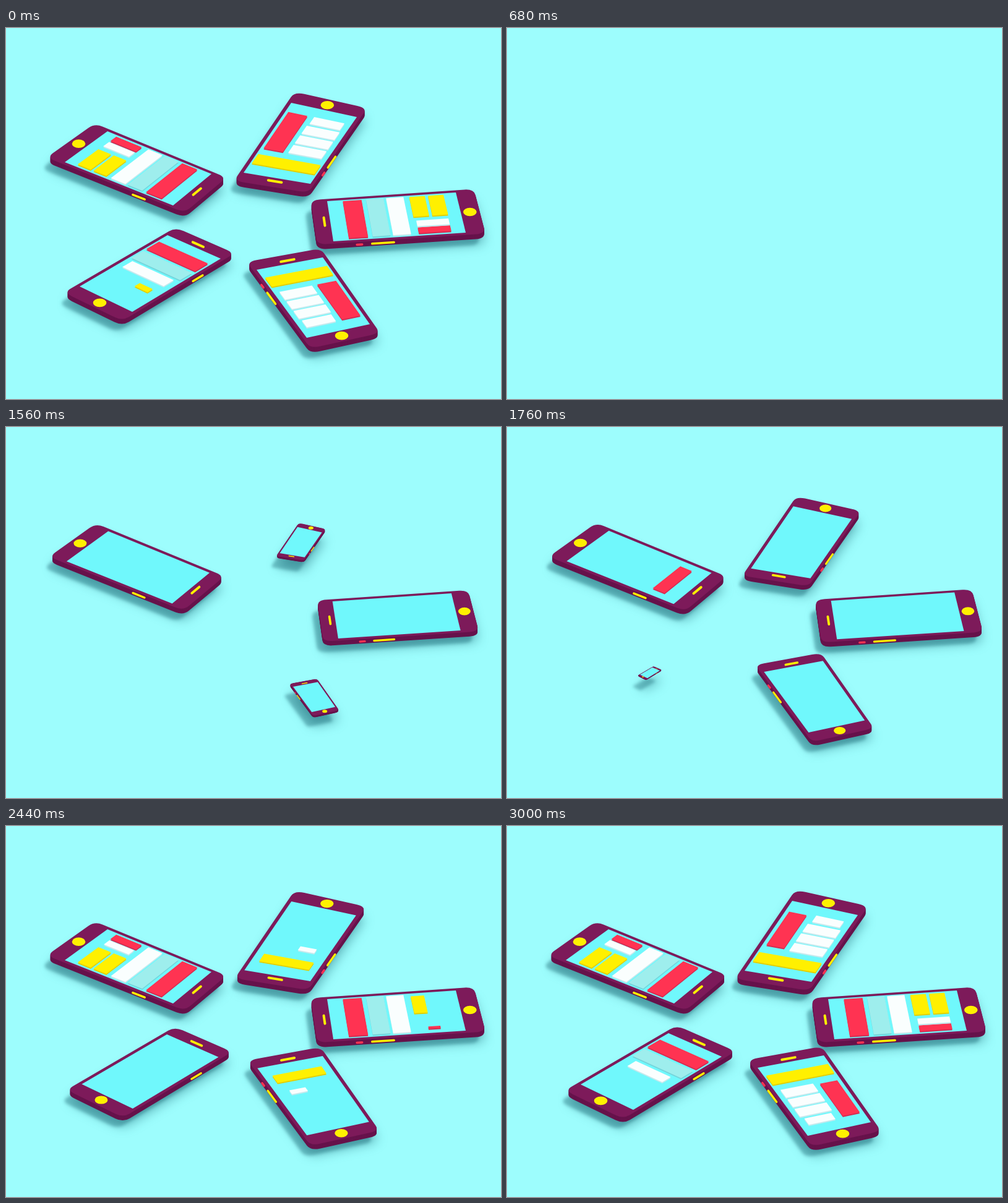
An HTML page with a canvas that plays this animation: 800x600 px, repeating every 3.04 s.

```html
<!DOCTYPE html>
<html lang="en">
<head>
<meta charset="utf-8">
<title>Phones</title>
<style>
html, body { margin: 0; width: 100%; height: 100%; overflow: hidden; background: #9dfdfd; }
canvas { display: block; width: 800px; height: 600px; }
</style>
</head>
<body>
<canvas id="stage" width="800" height="600"></canvas>
<script>
const ctx = document.getElementById('stage').getContext('2d');
const LOOP = 3040, STEP = 40, EMPTY = 680;

const RED = ['#ff3352', '#d42c52'];
const YELLOW = ['#fff000', '#e3cf00'];
const WHITE = ['#fafefe', '#c4e9ed'];
const MINT = ['#9eeeed', '#74d5db'];
const BODY = '#7d1a5a', SIDE = '#66124b', SCREEN = '#70f8fc';

// Blocks on a screen: [u0, v0, u1, v1, colours, delay]
const page = [
  [.04, .12, .96, .265, RED, 0],
  [.04, .30, .96, .435, MINT, 140],
  [.04, .455, .96, .59, WHITE, 295],
  [.46, .635, .95, .755, YELLOW, 380],
  [.05, .65, .19, .895, RED, 480],
  [.46, .78, .95, .90, YELLOW, 540],
  [.22, .65, .36, .895, WHITE, 600]
];
const list = [
  [.03, .13, .97, .265, YELLOW, 0],
  [.08, .35, .58, .465, WHITE, 70],
  [.08, .49, .58, .605, WHITE, 230],
  [.08, .63, .58, .745, WHITE, 390],
  [.66, .35, .95, .87, RED, 510],
  [.08, .77, .58, .88, WHITE, 550]
];

// quad: screen corners, clockwise from the speaker's left; edge: side with buttons
const phones = [
  { quad: [[332, 236], [270, 287], [95, 217], [164, 167]], edge: 1, blocks: page, born: 765, fill: 1660, leave: 220 },
  { quad: [[492, 252], [384, 234], [461, 121], [567, 144]], edge: 0, blocks: list, born: 1490, fill: 2330, leave: 300 },
  { quad: [[529, 345], [519, 280], [727, 266], [743, 331]], edge: 0, blocks: page, born: 1160, fill: 1930, leave: 260 },
  { quad: [[261, 335], [347, 373], [204, 459], [119, 418]], edge: 1, blocks: page, born: 1720, fill: 2620, leave: 340 },
  { quad: [[405, 391], [512, 371], [588, 479], [486, 501]], edge: 0, blocks: list, born: 1490, fill: 2330, leave: 300 }
];

const POP = [[0, 0], [40, .14], [80, .45], [120, .70], [180, .82], [270, .89],
             [500, .95], [700, .968], [940, .986], [1270, 1]];
const GROW = [[0, 0], [40, .5], [80, .7], [120, .84], [200, 1]];

const mix = (a, b, k) => a + (b - a) * k;

function sample(keys, t) {
  if (t <= 0) return 0;
  for (let i = 1; i < keys.length; i++) {
    const [t0, a] = keys[i - 1], [t1, b] = keys[i];
    if (t < t1) return mix(a, b, (t - t0) / (t1 - t0));
  }
  return 1;
}

function project([a, b, c, d], u, v) {
  return [0, 1].map(i => mix(mix(a[i], b[i], u), mix(d[i], c[i], u), v));
}

function fillPath(path, color, dx = 0, dy = 0) {
  ctx.save();
  ctx.translate(dx, dy);
  ctx.fillStyle = color;
  ctx.fill(path);
  ctx.restore();
}

function polygon(pts) {
  const path = new Path2D();
  pts.forEach(([x, y]) => path.lineTo(x, y));
  path.closePath();
  return path;
}

// Rounds the corners in screen units, so that they follow the perspective
function roundedBody(at) {
  const u0 = -.055, u1 = 1.055, v0 = -.125, v1 = 1.145, ru = .15, rv = .075;
  const path = new Path2D();
  path.moveTo(...at(u0 + ru, v0));
  path.lineTo(...at(u1 - ru, v0));
  path.quadraticCurveTo(...at(u1, v0), ...at(u1, v0 + rv));
  path.lineTo(...at(u1, v1 - rv));
  path.quadraticCurveTo(...at(u1, v1), ...at(u1 - ru, v1));
  path.lineTo(...at(u0 + ru, v1));
  path.quadraticCurveTo(...at(u0, v1), ...at(u0, v1 - rv));
  path.lineTo(...at(u0, v0 + rv));
  path.quadraticCurveTo(...at(u0, v0), ...at(u0 + ru, v0));
  return path;
}

function shadow(path, dx, dy, blur, alpha) {
  ctx.filter = `blur(${blur}px)`;
  fillPath(path, `rgba(22,98,112,${alpha})`, dx, dy);
  ctx.filter = 'none';
}

function drawPhone(phone, time, now) {
  let s = sample(POP, time - phone.born);
  if (now < EMPTY) {
    const k = Math.min(1, Math.max(0, (now - phone.leave) / 320));
    s *= 1 - k * k * k;
  }
  if (s < .01) return;

  const mid = project(phone.quad, .5, .515);
  const at = (u, v, dy = 0) => {
    const p = project(phone.quad, u, v);
    return [mix(mid[0], p[0], s), mix(mid[1], p[1], s) + dy * s];
  };
  const rect = (u0, v0, u1, v1, dy) =>
    polygon([at(u0, v0, dy), at(u1, v0, dy), at(u1, v1, dy), at(u0, v1, dy)]);
  const pill = (a, b, width, color) => {
    ctx.beginPath();
    ctx.moveTo(...a);
    ctx.lineTo(...b);
    ctx.lineCap = 'round';
    ctx.lineWidth = width * s;
    ctx.strokeStyle = color;
    ctx.stroke();
  };

  const body = roundedBody(at);
  shadow(body, -9, 18, 2.5, .38);
  shadow(body, 0, 17, 9, .45);
  for (let h = 8; h > 0; h--) fillPath(body, SIDE, 0, h * s);
  fillPath(body, BODY);
  fillPath(rect(0, 0, 1, 1), SCREEN);

  if (phone.edge) {
    pill(at(1.06, .24, 4), at(1.06, .35, 4), 3.5, YELLOW[0]);
  } else {
    pill(at(-.06, .175, 4), at(-.06, .215, 4), 3.5, RED[0]);
    pill(at(-.06, .29, 4), at(-.06, .455, 4), 3.5, YELLOW[0]);
  }
  pill(at(.4, -.045), at(.6, -.045), 4, YELLOW[0]);

  const home = at(.5, 1.07);
  ctx.fillStyle = YELLOW[0];
  ctx.beginPath();
  ctx.ellipse(home[0], home[1], 10.8 * s, 6.8 * s, 0, 0, Math.PI * 2);
  ctx.fill();

  for (const [u0, v0, u1, v1, [top, low], delay] of phone.blocks) {
    const g = sample(GROW, time - phone.fill - delay);
    if (!g) continue;
    const cu = (u0 + u1) / 2, cv = (v0 + v1) / 2;
    const du = (u1 - u0) / 2 * g, dv = (v1 - v0) / 2 * g;
    const face = dy => rect(cu - du, cv - dv, cu + du, cv + dv, dy);
    fillPath(face(1), low);
    fillPath(face(-1), top);
  }
}

function draw(now) {
  ctx.fillStyle = '#9dfdfd';
  ctx.fillRect(0, 0, 800, 600);
  const time = now < EMPTY ? now + LOOP : now;
  for (const phone of phones) drawPhone(phone, time, now);
}

const start = performance.now();
function tick() {
  const now = (performance.now() - start) % LOOP;
  draw(Math.floor(now / STEP) * STEP);
  requestAnimationFrame(tick);
}
tick();
</script>
</body>
</html>
```
